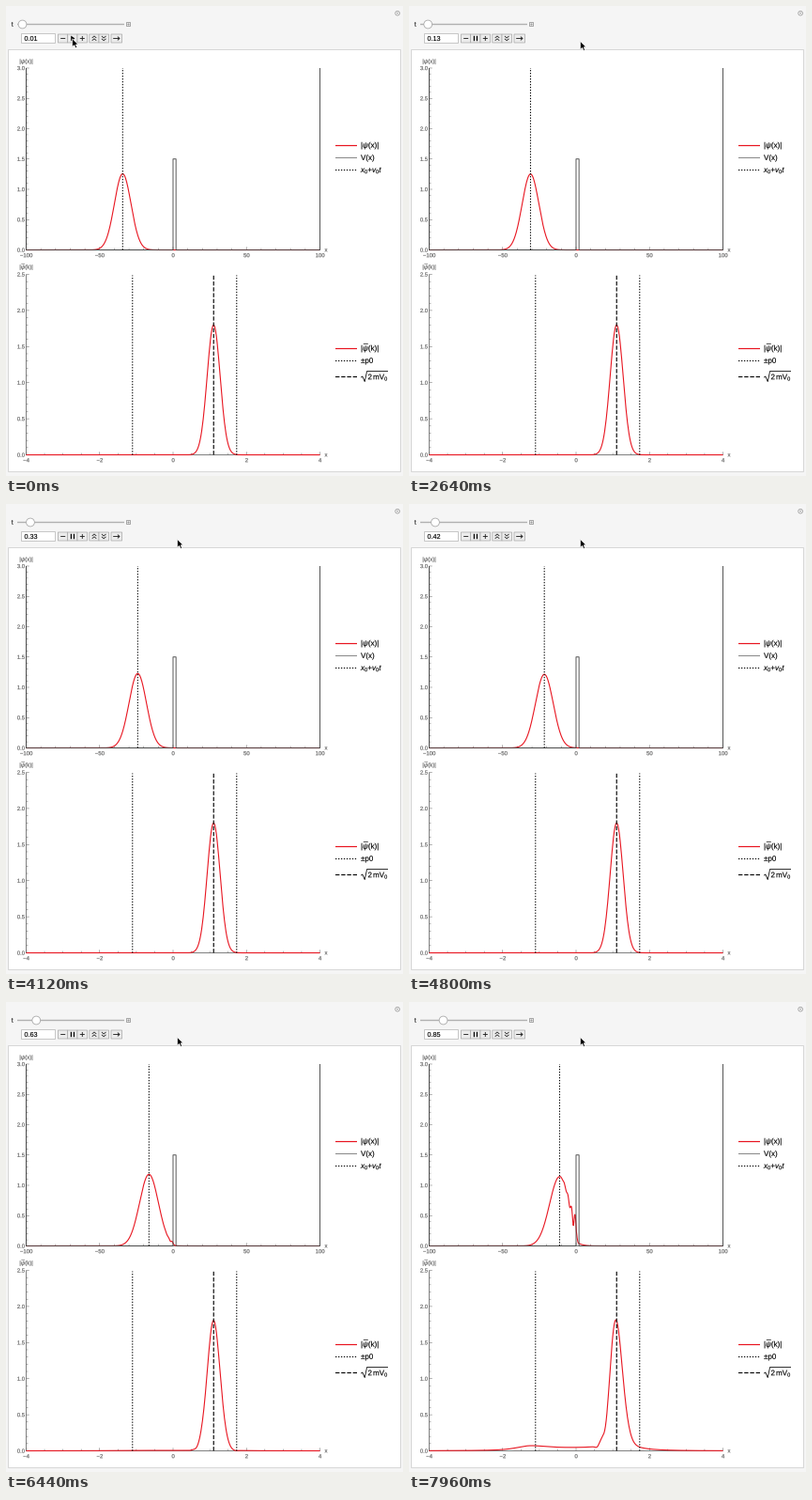
A matplotlib script for the animation above (8 s loop, 423 px wide and 500 px high).

```python
import numpy as np
import matplotlib.pyplot as plt
from matplotlib.animation import FuncAnimation
from matplotlib.collections import LineCollection
from matplotlib.patches import Circle, PathPatch, Polygon, Rectangle
from matplotlib.textpath import TextPath
from matplotlib.transforms import Affine2D

W, H = 423, 500
STEP, FRAMES = 40, 200
RED, INK, GREY = "#e8141f", "#222222", "#606060"
DOTS, DASHES = (0, (1.2, 1.5)), (0, (3.8, 1.6))

plt.rcParams.update({
    "font.family": "Liberation Sans",
    "mathtext.fontset": "custom",
    "mathtext.rm": "Liberation Sans",
    "mathtext.it": "Liberation Sans:italic",
    "path.snap": False,
})

# At 72 dpi one point is one pixel.
fig = plt.figure(figsize=(W / 72, H / 72), dpi=72, facecolor="#f5f5f5")
ax = fig.add_axes([0, 0, 1, 1])
ax.set(xlim=(0, W), ylim=(H, 0))
ax.axis("off")


# ---- wave packet hitting a barrier (hbar = m = 1) ----
X0, P0, VAR, V0, BAR = -35, 1.105, 32, 1.5, 2
PEAK_X, PEAK_K = 1.256, 1.8
N = 800
x = np.linspace(-100, 100, N, endpoint=False)
dx = x[1] - x[0]
k = np.linspace(-4, 4, 401)

wave = 2 * np.pi * np.fft.fftfreq(N, dx)
ham = np.fft.ifft((wave ** 2 / 2)[:, None] * np.fft.fft(np.eye(N), axis=0), axis=0).real
ham += np.diag(np.where((x >= 0) & (x < BAR), V0, 0.0))
energy, modes = np.linalg.eigh((ham + ham.T) / 2)
coef = modes.T @ (PEAK_X * np.exp(-(x - X0) ** 2 / (2 * VAR) + 1j * P0 * x))
scale_k = PEAK_K / (PEAK_X * np.sqrt(2 * np.pi * VAR))
fourier = scale_k * dx * np.exp(-1j * np.outer(k, x))


def packet(center):
    time = (center - X0) / P0
    psi = modes @ (coef * np.exp(-1j * energy * time))
    return np.abs(psi), np.abs(fourier @ psi)


# ---- drawing helpers ----
def line(xs, ys, color=INK, lw=1.0, **kw):
    kw.setdefault("solid_capstyle", "butt")
    return ax.plot(xs, ys, color=color, lw=lw, **kw)[0]


def glyphs(px, py, s, size, align=0.0):
    """Outline of a text; align is the share of its width left of px."""
    path = TextPath((0, 0), s, size=size)
    shift = align * path.get_extents().x1
    return path.transformed(Affine2D().scale(1, -1).translate(px - shift, py))


def text(px, py, s, size, color="black", align=0.0):
    return ax.add_patch(PathPatch(glyphs(px, py, s, size, align),
                                  fc=color, ec=color, lw=0.15, zorder=3))


def box(x0, y0, x1, y1, face, edge, lw=0.8):
    ax.add_patch(Rectangle((x0, y0), x1 - x0, y1 - y0, fc=face, ec=edge, lw=lw))


LEFT, RIGHT = 21.5, 334.5


class Plot:
    """Maps data to stage pixels and draws the axes."""

    def __init__(self, xmax, ymax, top, base):
        self.xmax, self.ymax, self.top, self.base = xmax, ymax, top, base

    def px(self, v):
        return LEFT + (np.asarray(v) + self.xmax) / (2 * self.xmax) * (RIGHT - LEFT)

    def py(self, v):
        return self.base - np.asarray(v) / self.ymax * (self.base - self.top)

    def axes(self, major, minor):
        marks = []
        for i in range(round(2 * self.xmax / minor) + 1):
            v = -self.xmax + i * minor
            p = self.px(v)
            big = abs(v / major - round(v / major)) < 1e-6
            marks.append([(p, self.base), (p, self.base - (3.2 if big else 1.9))])
            if big:
                label = f"{abs(v):g}"
                text(p, self.base + 7.7, "\u2212" + label if v < 0 else label, 6, GREY, 0.5)
        for i in range(round(self.ymax * 10) + 1):
            p = self.py(i / 10)
            big = i % 5 == 0
            marks.append([(LEFT, p), (LEFT + (3.2 if big else 1.9), p)])
            if big:
                text(19.8, p + 2.1, f"{i / 10:.1f}", 5.9, GREY, 1)
        ax.add_collection(LineCollection(marks, colors=GREY, linewidths=0.5, zorder=2))
        line([LEFT, LEFT, RIGHT], [self.top, self.base, self.base], GREY, 0.8)
        text(339.5, self.base + 1.8, "x", 6, GREY)


# ---- control bar ----
ax.add_patch(Circle((417.1, 7.7), 2.3, fc="white", ec="#999999", lw=0.8))
line([416, 418.2], [7.7, 7.7], "#999999", 0.6)
line([417.1, 417.1], [6.6, 8.8], "#999999", 0.6)

text(5.7, 21.6, "t", 7, INK)
line([12, 126], [19.5, 19.5], "#b0b0b0", 1.4)
knob = ax.add_patch(Circle((17.5, 19.5), 4.4, fc="white", ec="#a8a8a8", lw=0.8, zorder=4))
box(128.5, 17.5, 132.5, 21.5, "#eeeeee", "#888888", 0.7)
line([129.3, 131.7], [19.5, 19.5], "#888888", 0.6)
line([130.5, 130.5], [18.3, 20.7], "#888888", 0.6)

box(16.5, 29.5, 52.5, 39.5, "white", "#bbbbbb")
value = text(19.5, 37, "0.01", 7.2)

for x0, x1 in ((55.5, 65.7), (65.7, 76.0), (76.0, 86.5),
               (88.8, 99.0), (99.0, 109.5), (112.0, 123.5)):
    box(x0, 30, x1, 39, "#ececec", "#a6a6a6", 0.7)
line([58.2, 63.2], [34.5, 34.5], INK, 0.9)
line([78.8, 83.8], [34.5, 34.5], INK, 0.9)
line([81.3, 81.3], [32, 37], INK, 0.9)
for cx, way in ((94, 1), (104.2, -1)):
    for off in (-1.5, 1.3):
        line([cx - 2.3, cx, cx + 2.3],
             34.5 + off + way * np.array([1, -1, 1]), INK, 0.8)
line([114.2, 121], [34.5, 34.5], INK, 0.9)
line([118.9, 121, 118.9], [32.6, 34.5, 36.4], INK, 0.9)

play = ax.add_patch(Polygon([(69.2, 31.6), (73.4, 34.5), (69.2, 37.4)], fc="black", lw=0))
pause = [line([p, p], [31.8, 37.2], "black", 1.2) for p in (69.4, 72.5)]

# ---- plots ----
box(2.5, 46.5, 420.5, 495.5, "white", "#cfcfcf")
top = Plot(100, 3, 66, 259.5)
low = Plot(4, 2.5, 285.5, 477.5)
top.axes(50, 10)
low.axes(2, 0.5)

text(14.3, 60.8, r"|$\psi$(x)|", 6, GREY)
text(14.3, 279.6, r"|$\psi$(k)|", 6, GREY)
line([16.3, 20], [274.2, 274.2], GREY, 0.6)

curve_x = line([], [], RED, 1.1, zorder=3)
curve_k = line([], [], RED, 1.1, zorder=3)
line(top.px([-100, -100, 0, 0, BAR, BAR, 100, 100]),
     top.py([3, 0, 0, V0, V0, 0, 0, 3]), "#444444", 0.9, zorder=3.2)
guide = line([], [], "black", 1.1, ls=DOTS, zorder=3.4)
for p in (-P0, np.sqrt(2 * V0)):
    line(low.px([p, p]), [low.base, 286.5], "black", 1.1, ls=DOTS, zorder=3.4)
line(low.px([P0, P0]), [low.base, 286.5], "black", 1.15, ls=DASHES, zorder=3.4)

# ---- legends ----
KEY = [351, 374]
for y, color, lw, ls in ((148.5, RED, 1.2, "-"), (161.5, "#888888", 1, "-"),
                         (174.5, "black", 1.1, DOTS), (364.5, RED, 1.2, "-"),
                         (377.5, "black", 1.1, DOTS), (394.5, "black", 1.15, DASHES)):
    line(KEY, [y, y], color, lw, ls=ls)
text(378, 150.7, r"|$\psi$(x)|", 8)
text(378, 163.9, "V(x)", 8)
text(378, 176.9, r"$x_0{+}v_0t$", 8)
text(378, 366.7, r"|$\psi$(k)|", 8)
line([380.8, 385.8], [359.3, 359.3], "black", 0.7)
text(378, 379.8, "\u00b1p0", 8)
line([378.2, 379.8, 382.2, 384.6, 407], [395.2, 394, 399.6, 388.5, 388.5], "black", 0.8)
text(385.5, 397.2, r"2$\,\mathrm{mV}_\mathrm{0}$", 8)

# ---- mouse pointer ----
ARROW = np.array([(0, 0), (0, 8.6), (2, 6.8), (3.4, 9.8), (4.9, 9.1), (3.6, 6.2), (6.2, 6.1)])
pointer = ax.add_patch(Polygon(ARROW, fc="black", ec="white", lw=0.6, zorder=6))

# ---- timeline ----
START, MOVED, PRESSED = 1440, 2240, 1160
STALLS = ((2440, 2640), (3160, 3360), (4200, 4440), (5200, 5280), (5280, 5520), (7440, 7640))
MS = [START, 2640, 3360, 4800, 5880, 7040, 7960]
SHOWN = [0.01, 0.13, 0.23, 0.42, 0.56, 0.71, 0.85]
CENTER = [-34.3, -31.0, -26.8, -21.6, -19.0, -13.6, -11.2]


def clock(ms):
    for a, b in STALLS:
        if a < ms < b:
            return a
    return ms


def draw(i):
    ms = i * STEP
    now = clock(ms)
    center = np.interp(now, MS, CENTER)

    value.set_path(glyphs(19.5, 37, f"{np.interp(now, MS, SHOWN):.2f}", 7.2))
    knob.center = (17.5 + (center - CENTER[0]) * 0.825, 19.5)
    running = ms >= PRESSED
    play.set_visible(not running)
    for bar in pause:
        bar.set_visible(running)

    u = np.clip((ms - START) / (MOVED - START), 0, 1)
    u = u * u * (3 - 2 * u)
    pointer.set_xy(ARROW + (70.7 + 111.9 * u, 34.8 + 2.8 * u))

    amp_x, amp_k = packet(center)
    curve_x.set_data(top.px(x), top.py(amp_x))
    curve_k.set_data(low.px(k), low.py(amp_k))
    guide.set_data([top.px(center)] * 2, [top.base, top.top])


anim = FuncAnimation(fig, draw, frames=FRAMES, interval=STEP, repeat=True,
                     repeat_delay=0, init_func=lambda: draw(0), blit=False)
plt.show()
```
